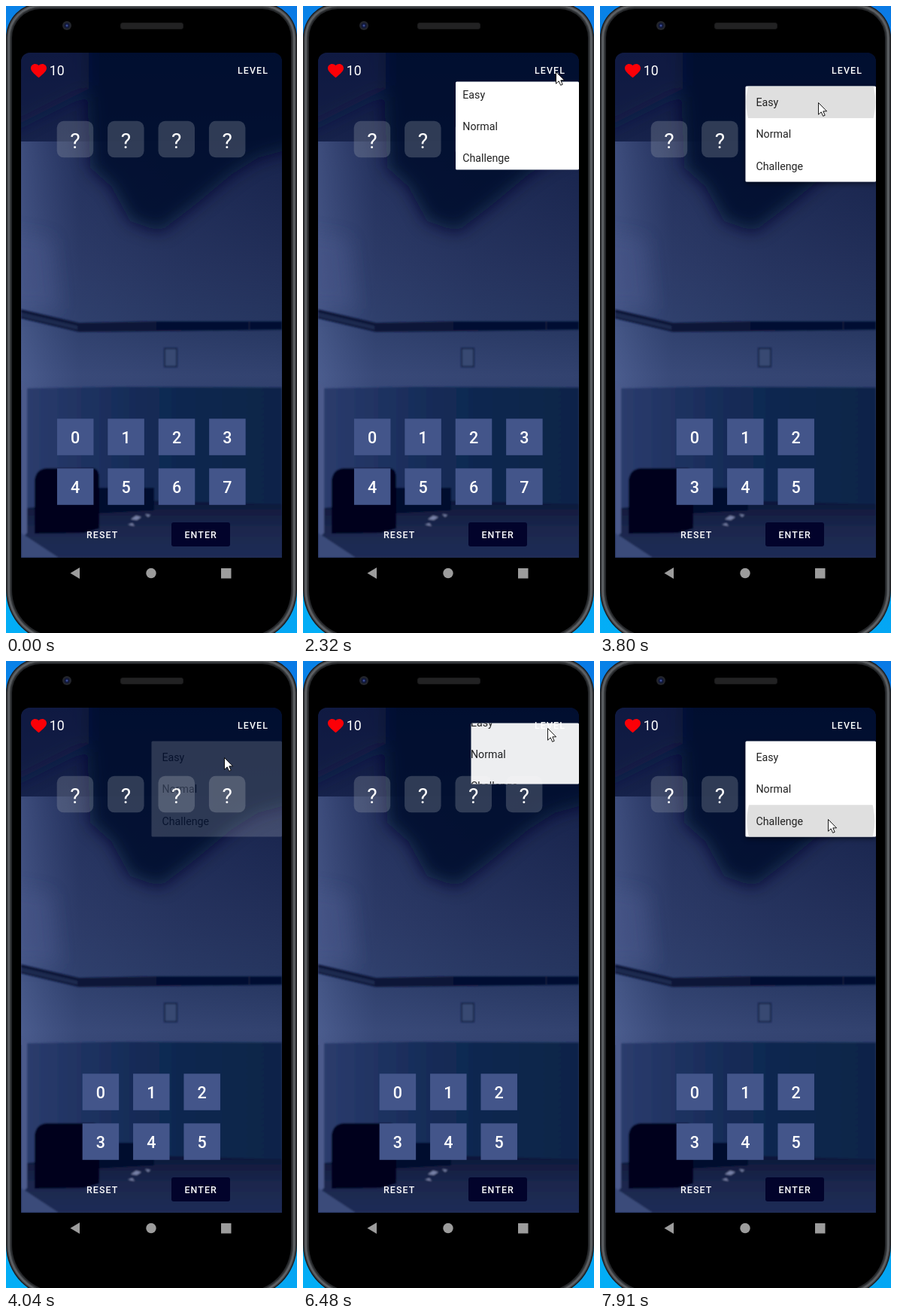
An HTML page for the animation above (8 s loop, 387 by 833 pixels).

```html
<!DOCTYPE html>
<html lang="en">
<head>
<meta charset="utf-8">
<title>Code breaker level menu</title>
<style>
html, body { margin: 0; width: 100%; height: 100%; overflow: hidden; background: linear-gradient(20deg, #03aef6, #0a7ae5); }
svg { display: block; width: 387px; height: 833px; font-family: Roboto, sans-serif; }
.mid { text-anchor: middle; fill: #fff; }
.caps { font-size: 12.4px; font-weight: 500; letter-spacing: 1.1px; fill: #fff; }
.item { font-size: 14.2px; fill: #222; }
</style>
</head>
<body>
<svg viewBox="0 0 387 833">
  <defs>
    <linearGradient id="wall" x2="0" y2="1">
      <stop offset="0" stop-color="#0d173f"/>
      <stop offset=".2" stop-color="#18244d"/>
      <stop offset=".42" stop-color="#222f59"/>
      <stop offset=".54" stop-color="#263660"/>
      <stop offset=".64" stop-color="#32426f"/>
      <stop offset="1" stop-color="#1a264e"/>
    </linearGradient>
    <linearGradient id="light">
      <stop offset="0" stop-color="#6477ad" stop-opacity=".5"/>
      <stop offset=".22" stop-color="#5568a0" stop-opacity=".2"/>
      <stop offset=".6" stop-color="#5568a0" stop-opacity=".08"/>
      <stop offset="1" stop-color="#5568a0" stop-opacity="0"/>
    </linearGradient>
    <linearGradient id="dado">
      <stop offset="0" stop-color="#2b3c6d"/>
      <stop offset=".3" stop-color="#1b2f5d"/>
      <stop offset=".6" stop-color="#0e2850"/>
      <stop offset="1" stop-color="#0b2448"/>
    </linearGradient>
    <linearGradient id="floor" x2="0" y2="1">
      <stop offset="0" stop-color="#0c1638"/>
      <stop offset=".5" stop-color="#1b274d"/>
      <stop offset="1" stop-color="#202d56"/>
    </linearGradient>
    <filter id="soft" x="-20%" y="-20%" width="140%" height="140%"><feGaussianBlur stdDeviation="11"/></filter>
    <filter id="slight"><feGaussianBlur stdDeviation=".8"/></filter>
    <filter id="shade" x="-10%" y="-10%" width="120%" height="125%">
      <feDropShadow dx="0" dy="3" stdDeviation="3" flood-opacity=".45"/>
    </filter>
    <clipPath id="screen"><path d="M20 733V74a12 12 0 0 1 12-12H355a12 12 0 0 1 12 12V733z"/></clipPath>
    <clipPath id="menuClip"><rect id="menuBox" rx="1.500"/></clipPath>
    <clipPath id="rowClip"><rect id="row" x="193.500" width="173.500" height="42.500"/></clipPath>
  </defs>

  <g id="body"></g>
  <rect x="152.500" y="22.500" width="83" height="8" rx="2.500" fill="#222223" stroke="#1a1a1b"/>
  <circle cx="81" cy="26" r="6" fill="#23252b"/>
  <circle cx="81" cy="26" r="3.500" fill="#11183a"/>
  <circle cx="81" cy="26" r="1.500" fill="#3b4d96"/>

  <!-- room -->
  <g clip-path="url(#screen)">
    <rect x="20" y="62" width="347" height="671" fill="url(#wall)"/>
    <rect x="20" y="180" width="347" height="330" fill="url(#light)"/>
    <g filter="url(#soft)">
      <path d="M104 30H400V184L335 202L300 224L252 264L205 300L165 286L140 240L112 215z" fill="#020a2e" opacity=".88"/>
      <path d="M0 40H110V110L0 165z" fill="#131c45" opacity=".7"/>
      <path d="M0 300L60 310L70 402L0 400z" fill="#4a5a8c" opacity=".4"/>
    </g>
    <g filter="url(#slight)">
      <path d="M20 403L97 421L200 419H367V430L200 432L97 433L20 415z" fill="#0c1638"/>
      <path d="M20 407L95 425V430L20 413z" fill="#1f2b50"/>
      <path d="M200 420H322V430H200zM325 420H367V429H325z" fill="#050d30"/>
      <rect x="211" y="455" width="16" height="24" fill="#394872" stroke="#0f1a3e" stroke-width="1.500"/>
      <path d="M28 508L150 506L367 507V700H28z" fill="url(#dado)"/>
      <path d="M20 668L125 655L367 662V733H20z" fill="url(#floor)"/>
      <path d="M20 500L28 508V700L20 708z" fill="#4b5a8b"/>
      <path d="M20 700L70 733H20z" fill="#3b4b7a"/>
      <path d="M38 701V630Q40 615 54 614H116Q124 615 124 628V694L104 700z" fill="#02041f"/>
      <path d="M124 640H197V670L124 674z" fill="#060e2d"/>
      <path d="M166 682l7-5 7 2-6 4zM162 689l6-2 3 4zM185 675l7 1-3 3z" fill="#7882a8"/>
    </g>
  </g>

  <!-- game -->
  <path transform="translate(30.900 74)scale(1.050 1)" d="M12 21.350C5.400 15.360 2 12.280 2 8.500C2 5.420 4.420 3 7.500 3C9.240 3 10.910 3.810 12 5.090C13.090 3.810 14.760 3 16.500 3C19.580 3 22 5.420 22 8.500C22 12.280 18.600 15.360 12 21.350z" fill="#fb0007"/>
  <text x="57.800" y="92" font-size="17.700" fill="#fff">10</text>
  <text x="308" y="90" class="caps">LEVEL</text>
  <g id="slots"></g>
  <g id="keys"></g>
  <text x="107" y="707" class="caps">RESET</text>
  <rect x="220" y="686" width="78" height="32" rx="3" fill="#02032b"/>
  <text x="237.500" y="707" class="caps">ENTER</text>
  <path d="M85.500 753.500L98 746V761z" fill="#9c9c9c"/>
  <circle cx="193" cy="753.500" r="6.700" fill="#9c9c9c"/>
  <rect x="286" y="747" width="13.500" height="13.500" fill="#9c9c9c"/>

  <g id="menu">
    <rect id="paper" rx="1.500" fill="#fff"/>
    <g clip-path="url(#menuClip)">
      <g clip-path="url(#rowClip)"><circle id="ripple" cx="280.300" fill="#dfdfdf"/></g>
      <g id="items">
        <text class="item">Easy</text>
        <text class="item" y="42.300">Normal</text>
        <text class="item" y="84.800">Challenge</text>
      </g>
    </g>
  </g>
  <path id="cursor" d="M.5.500V16.200L4.200 12.800L6.700 18.300L9.200 17.200L6.800 11.800H11.600z" fill="#fff" stroke="#000" stroke-width=".9"/>
</svg>
<script>
const $ = id => document.getElementById(id);
const set = (el, attrs) => { for (const k in attrs) el.setAttribute(k, attrs[k]); };
const LOOP = 8000, PITCH = 67.4, SIZE = 48.5;

// time, tip x, tip y (no position: hidden)
const cursorSteps = [
  [0], [500, 377, 86], [650, 353, 86], [790, 341, 87], [920, 336, 87],
  [2740, 331, 91], [2860, 322, 101], [2980, 310, 112], [3110, 299, 121],
  [3230, 291, 126], [3380, 290, 128], [4310],
  [5330, 361, 84], [5480, 325, 89], [6930, 318, 140], [7050, 309, 190], [7200, 303, 210]
];

const open = { x: 193.5, top: 106.5, bottom: 233.5, textX: 207.5, textY: 133, alpha: 1, shadow: true };
const menuSteps = [
  [0],
  [2320, { ...open, x: 203, top: 100.5, bottom: 217.5, textX: 212.3, textY: 122.5, shadow: false }],
  [2440, open],
  [3680, { ...open, row: 0, radius: 84 }],
  [3800, { ...open, row: 0, radius: 86 }],
  [3920, { ...open, alpha: .6, shadow: false }],
  [4040, { ...open, alpha: .17, shadow: false }],
  [4160],
  [6480, { ...open, x: 223.5, top: 82.5, bottom: 163.5, textX: 223, textY: 129 - 42.3, alpha: .93, shadow: false }],
  [6630, { ...open, textY: 132.5, alpha: .98 }],
  [6780, open],
  [7910, { ...open, row: 2, radius: 85 }]
];

const at = (steps, t) => steps.findLast(s => s[0] <= t);

// Phone outline moved inwards by d, with tighter corners at the top.
function shell(d, fill) {
  const top = 46 - d, low = 70 - d, left = d, right = 387 - d;
  return `<path fill="${fill}" d="M${left} 42A${top} ${top} 0 0 1 46 ${d - 4}H341A${top} ${top} 0 0 1 ${right} 42
    V776A${low} ${low} 0 0 1 317 ${846 - d}H70A${low} ${low} 0 0 1 ${left} 776z"/>`;
}

function tile(x, y, label, fill, radius, size, weight, base) {
  return `<rect x="${x}" y="${y}" width="${SIZE}" height="${SIZE}" rx="${radius}" fill="${fill}"/>
    <text class="mid" x="${x + SIZE / 2}" y="${y + base}" font-size="${size}" font-weight="${weight}">${label}</text>`;
}

function keypad(cols) {
  const left = 193.3 - ((cols - 1) * PITCH + SIZE) / 2;
  return Array.from({ length: cols * 2 }, (_, i) =>
    tile(left + i % cols * PITCH, i < cols ? 548.3 : 614.3, i, '#43558a', 0, 21.5, 500, 33)).join('');
}

$('body').innerHTML = shell(0, '#1c1e21') + shell(1.5, '#4a4d51') + shell(3, '#63666a') +
  shell(4.5, '#45484b') + shell(6, '#26282b') + shell(8, '#000');
$('slots').innerHTML = [0, 1, 2, 3].map(i =>
  tile(67.7 + i * PITCH, 152.8, '?', 'rgba(160,165,175,.29)', 9, 28.3, 400, 36)).join('');

let shownCols = 0;
function draw(t) {
  const cols = t < 3800 ? 4 : 3;
  if (cols !== shownCols) {
    $('keys').innerHTML = keypad(cols);
    shownCols = cols;
  }

  const menu = at(menuSteps, t)[1];
  $('menu').style.display = menu ? '' : 'none';
  if (menu) {
    const box = { x: menu.x, y: menu.top, width: 367 - menu.x, height: menu.bottom - menu.top };
    set($('paper'), { ...box, filter: menu.shadow ? 'url(#shade)' : 'none' });
    set($('menuBox'), box);
    set($('menu'), { opacity: menu.alpha });
    set($('items'), { transform: `translate(${menu.textX} ${menu.textY})` });
    const rowY = 106.5 + (menu.row || 0) * 42.4;
    set($('row'), { y: rowY });
    set($('ripple'), { cy: rowY + 21.2, r: menu.radius || 0 });
  }

  const [, x, y] = at(cursorSteps, t);
  $('cursor').style.display = x === undefined ? 'none' : '';
  if (x !== undefined) set($('cursor'), { transform: `translate(${x} ${y})` });
}

const start = performance.now();
function frame() {
  draw((performance.now() - start) % LOOP);
  requestAnimationFrame(frame);
}
frame();
</script>
</body>
</html>
```
